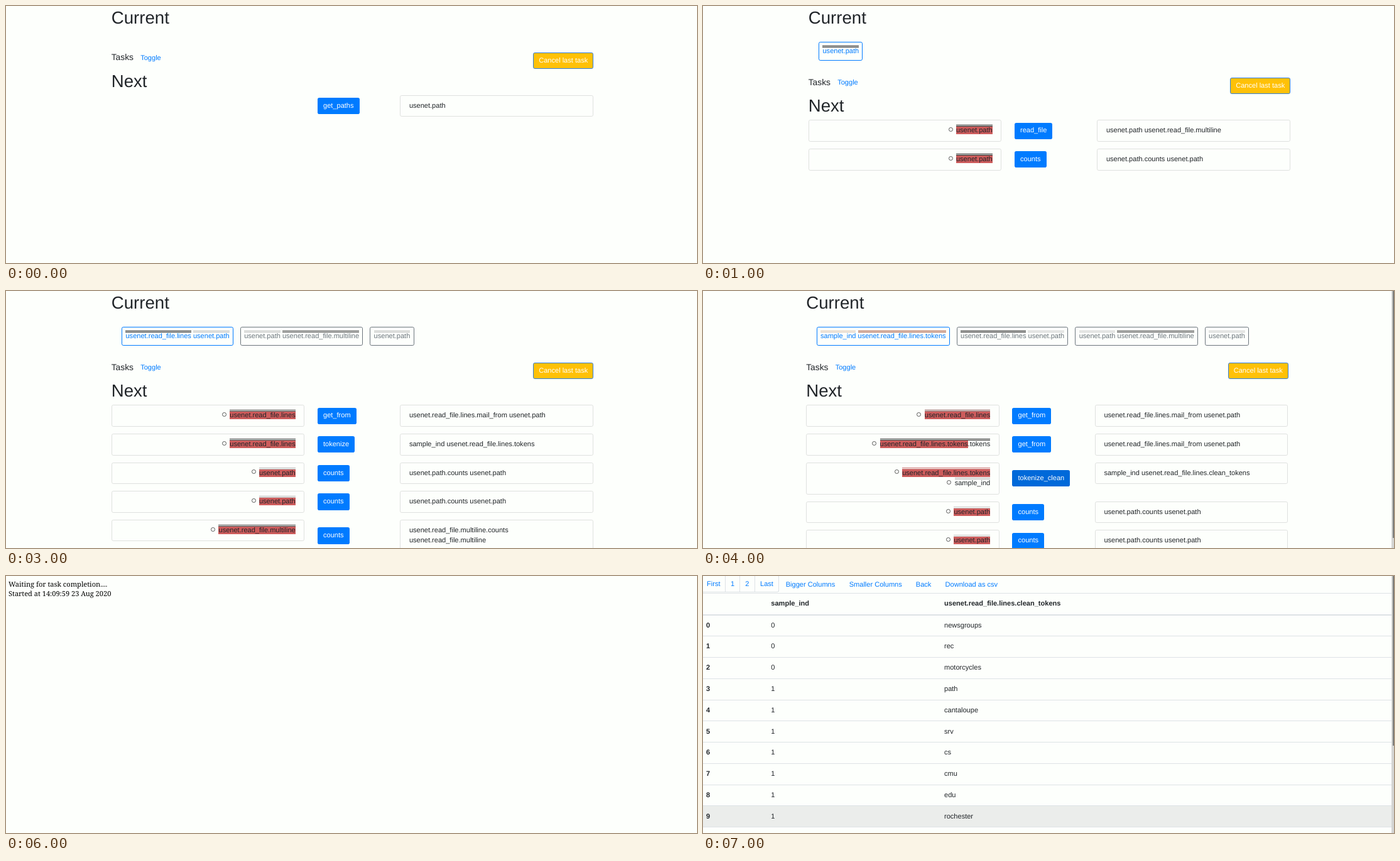
An HTML page that plays this animation: 1100x409 px, repeating every 8 s.

```html
<!DOCTYPE html>
<html lang="en">
<head>
<meta charset="utf-8">
<title>Task runner</title>
<style>
* { box-sizing: border-box; }
html, body { margin: 0; width: 100%; height: 100%; overflow: hidden; background: #fdfffc; }
#stage {
  position: relative; width: 1100px; height: 409px; overflow: hidden;
  font: 11.06px/16.6px "Liberation Sans", Arial, sans-serif;
  color: #212529; text-rendering: geometricPrecision; white-space: nowrap;
}
#stage > *, .page > * { position: absolute; }
.page { top: 0; width: 767.5px; height: 409px; }
.h1 { font-size: 27.65px; line-height: 30px; }
.h5 { font-size: 13.8px; }
.link { color: #007bff; }
.chips { left: 16.6px; top: 57.4px; width: 750px; display: flex; flex-wrap: wrap; gap: 10.6px 11.06px; }
.chip { height: 29.2px; padding: 5.3px 5.2px; border: 1px solid #6c757d; border-radius: 2.8px; color: #6c757d; }
.chip:first-child { border-color: #007bff; color: #007bff; }
.solid .chip:first-child { background: #007bff; color: #fff; }
.rows { left: 0; }
.row { display: grid; grid-template-columns: 328.3px 131.3px 307.6px; align-items: start; margin-bottom: 11.06px; }
.card { width: 307.6px; min-height: 34.57px; padding: 8px 13.6px; border: 1px solid #dfe1df; border-radius: 2.8px; white-space: normal; }
.inputs { text-align: right; }
.item::before {
  content: ""; display: inline-block; width: 5px; height: 5px; margin-right: 5.3px;
  border: 1px solid #555; border-radius: 50%; vertical-align: 1.2px;
}
.btn { height: 26.2px; padding: 4.8px 9px; border-radius: 2.8px; background: #007bff; color: #fff; place-self: center start; }
.hover { background: #0069d9; }
.cancel { right: 0; padding: 3.8px 8px; background: #ffc107; border: 1px solid #2f7de0; }
.col { border-top: 3px double; }
mark { background: #cd5c5c; color: inherit; }
.bar { right: 0; top: 0; width: 4px; height: 100%; background: #d4d5d3; }
.bar i { position: absolute; right: 0; top: 0; width: 2.5px; background: #7c7d7c; }
.wait { left: 4px; font: 11.06px/15.3px "Noto Serif", serif; color: #000; top: 6px; }
.rule { left: 0; width: 1096px; background: #dee2e6; height: 1px; }
</style>
</head>
<body>
<div id="stage"></div>
<script>
const path = 'usenet.path', file = 'usenet.read_file.', multi = file + 'multiline',
  lines = file + 'lines', tokens = lines + '.tokens', clean = lines + '.clean_tokens',
  sample = 'sample_ind', mail = `${lines}.mail_from ${path}`;

const col = (html, color) => `<span class="col" style="border-color:${color}">${html}</span>`;
const item = ([name, color, suffix = '']) =>
  `<div class="item">${col(name === sample ? name : `<mark>${name}</mark>${suffix}`, color)}</div>`;
const chip = cols => `<div class="chip">${cols.map(c => col(...c)).join(' ')}</div>`;
const row = ([inputs, task, output, state = '']) => `<div class="row">
  <div class="${inputs.length ? 'card inputs' : ''}">${inputs.map(item).join('')}</div>
  <div class="btn ${state}">${task}</div><div class="card">${output}</div></div>`;
const counts = (name, color) => [[[name, color]], 'counts', `${name}.counts ${name === path ? path : multi}`];
const bar = height => `<div class="bar"><i style="height:${height}px"></i></div>`;

function page({ chips = [], chipLines = 1, rows, thumb = 0, solid = '' }) {
  const y = 39.8 * chipLines;
  return `<div class="page" style="left:${thumb ? 164.2 : 167.7}px">
    <div class="h1" style="top:3.5px">Current</div>
    <div class="chips ${solid}">${chips.map(chip).join('')}</div>
    <div class="h5" style="top:${y + 74}px">Tasks</div>
    <div class="link" style="left:46.5px;top:${y + 74.5}px">Toggle</div>
    <div class="btn cancel" style="top:${y + 74.2}px">Cancel last task</div>
    <div class="h1" style="top:${y + 104.5}px">Next</div>
    <div class="rows" style="top:${y + 141.5}px">${rows.map(row).join('')}</div>
  </div>${thumb ? bar(thumb) : ''}`;
}

function table() {
  const at = (x, y, text, style = '') =>
    `<div style="left:${x}px;top:${y - 8.3}px;${style}">${text}</div>`;
  const rule = (y, h = 1) => `<div class="rule" style="top:${y}px;height:${h}px"></div>`;
  const links = [[6, 'First'], [44, 1], [67.3, 2], [91, 'Last']].map(([x, t]) => at(x, 13.2, t, 'color:#007bff'))
    .concat([[131.7, 'Bigger Columns'], [232.7, 'Smaller Columns'], [338.8, 'Back'], [385.6, 'Download as csv']]
      .map(([x, t]) => at(x, 14, t, 'color:#007bff')));
  const edges = [35, 58, 82, 120].map(x =>
    `<div style="left:${x}px;top:0;width:1px;height:25px;background:#dee2e6"></div>`);
  const bold = 'font-weight:bold';
  const words = ['newsgroups', 'rec', 'motorcycles', 'path', 'cantaloupe', 'srv', 'cs', 'cmu', 'edu', 'rochester'];
  const body = words.map((word, i) => {
    const y = 78.9 + 33.78 * i;
    return at(5, y, i, bold) + at(108.3, y, i < 3 ? 0 : 1) + at(384, y, word) + rule(Math.round(y + 16.3));
  });
  return `<div style="left:0;top:366px;width:1096px;height:33px;background:#ebedeb"></div>
    <div style="left:-4px;top:-2px;width:125px;height:28px;border:1px solid #dee2e6;border-radius:3px"></div>
    ${edges.join('')}${links.join('')}${rule(27)}${rule(61, 2)}
    ${at(108.3, 44.6, sample, bold)}${at(384, 44.6, clean, bold)}${body.join('')}${bar(270)}`;
}

const scenes = [
  page({ chipLines: 0, rows: [[[], 'get_paths', path]] }),
  page({
    chips: [[[path, '#222']]],
    rows: [[[[path, '#222']], 'read_file', `${path} ${multi}`], counts(path, '#222')]
  }),
  page({
    chips: [[[path, '#222'], [multi, '#eadfd6']], [[path, '#222']]],
    rows: [
      [[[multi, '#eadcdc']], 'get_splits', `${lines} ${path}`],
      counts(path, '#111'), counts(path, '#655'), counts(multi, '#eadcdc')
    ]
  }),
  page({
    chips: [[[lines, '#222'], [path, '#bbb']], [[path, '#bbb'], [multi, '#444']], [[path, '#bbb']]],
    rows: [
      [[[lines, '#444']], 'get_from', mail],
      [[[lines, '#444']], 'tokenize', `${sample} ${tokens}`],
      counts(path, '#bbb'), counts(path, '#bbb'), counts(multi, '#444')
    ]
  }),
  page({
    thumb: 393,
    chips: [
      [[sample, '#dcc5b0'], [tokens, '#a8583c']], [[lines, '#222'], [path, '#ccc']],
      [[path, '#ccc'], [multi, '#444']], [[path, '#ccc']]
    ],
    rows: [
      [[[lines, '#855']], 'get_from', mail],
      [[[tokens, '#333', '.tokens']], 'get_from', mail],
      [[[tokens, '#c77'], [sample, '#bbb']], 'tokenize_clean', `${sample} ${clean}`, 'hover'],
      counts(path, '#ccc'), counts(path, '#ccc')
    ]
  }),
  page({
    thumb: 364, chipLines: 2, solid: 'solid',
    chips: [
      [[sample, '#d5e6ff'], [clean, '#7a62c0']], [[sample, '#e6dcd8'], [tokens, '#d8b8a0']],
      [[lines, '#111'], [path, '#aaa']], [[path, '#8fa3a0'], [multi, '#222']], [[path, '#9db0a8']]
    ],
    rows: [
      [[[lines, '#411']], 'get_from', mail],
      [[[tokens, '#c09a80', '.tokens']], 'get_from', mail],
      [[[clean, '#c03030', '.clean_tokens']], 'get_from', mail],
      counts(path, '#7a8a8a'), counts(path, '#7a8a8a')
    ]
  }),
  '<div class="wait">Waiting for task completion....<br>Started at 14:09:59 23 Aug 2020</div>',
  table()
];

const stage = document.getElementById('stage');
const start = performance.now();
let shown = -1;
function tick() {
  const index = Math.floor((performance.now() - start) / 1000) % scenes.length;
  if (index !== shown) stage.innerHTML = scenes[shown = index];
  requestAnimationFrame(tick);
}
tick();
</script>
</body>
</html>
```
